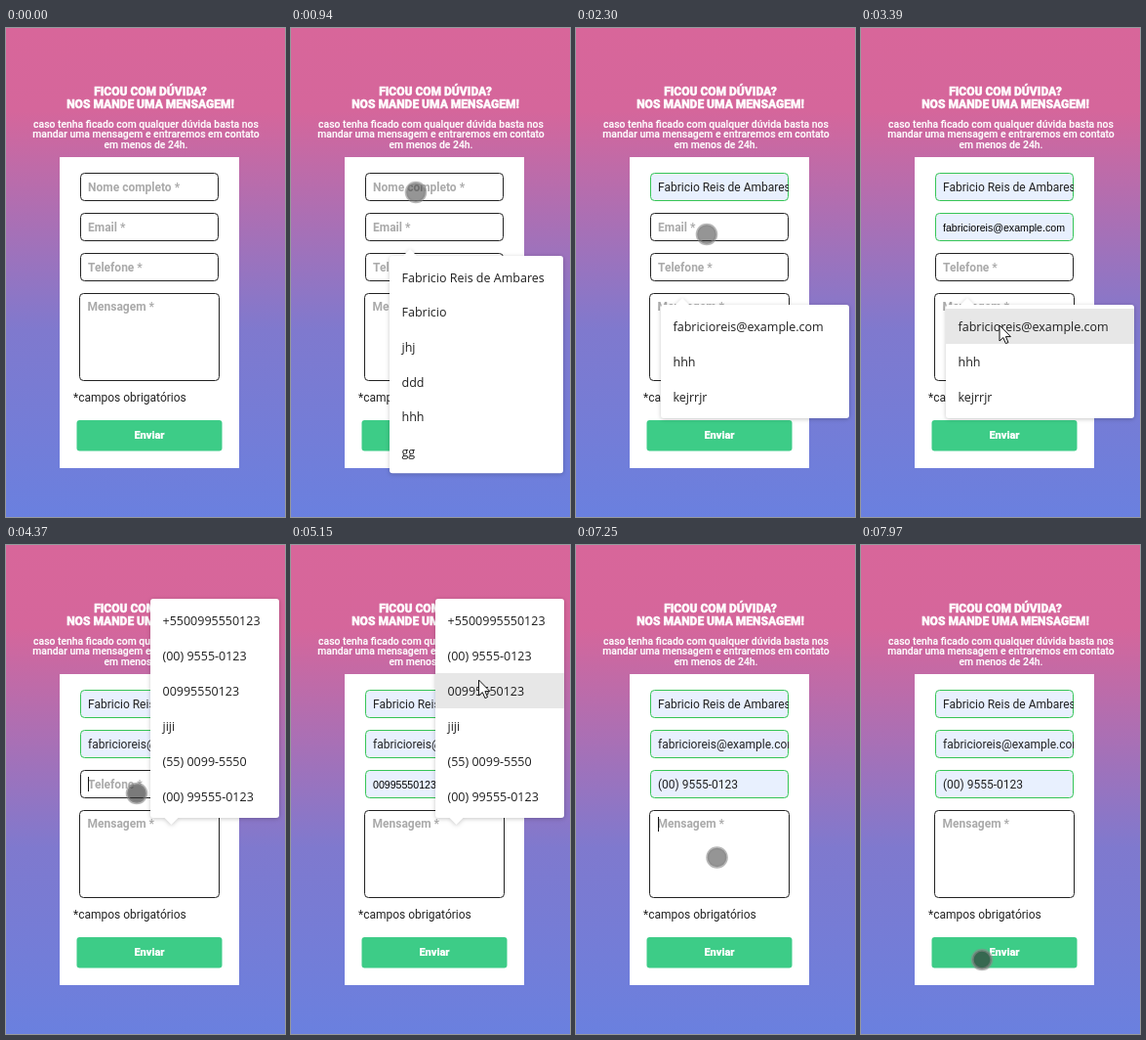
An HTML page that plays this animation: 286x500 px, repeating every 8 s.

```html
<!DOCTYPE html>
<html lang="pt">
<head>
<meta charset="utf-8">
<title>Formulário</title>
<style>
html, body { margin: 0; width: 100%; height: 100%; overflow: hidden; }
svg { display: block; }
#stage { width: 286px; height: 500px; font: 12px Roboto, sans-serif;
  background: linear-gradient(#d8669a, #d5669b 17%, #7f79ce 62%, #6a80df); }
.head, .sub, .send { fill: #fff; stroke: #fff; text-anchor: middle; }
.head { font-weight: 900; stroke-width: .4px; }
.sub { font-weight: 500; font-size: 10.4px; stroke-width: .15px; }
.send { font-weight: 900; font-size: 11px; stroke-width: .2px; }
.box { fill: #fff; stroke: #222; }
.box.filled { fill: #e8f0fe; stroke: #35c556; }
.value { fill: #222; }
.value.empty { font-weight: 700; fill: #aaa; }
.value.preview { font: 10.6px "Liberation Sans", Arial, sans-serif; fill: #000; }
.popup { font: 12.5px "Open Sans", "Noto Sans", sans-serif; fill: #1f1f1f;
  filter: drop-shadow(0 1px 2px rgba(0, 0, 0, .22)); }
.panel { fill: #fff; }
.hover { fill: #e7e7e7; }
</style>
</head>
<body>
<svg id="stage" viewBox="0 0 286 500">
  <text class="head" x="148" y="69">FICOU COM DÚVIDA?</text>
  <text class="head" x="148" y="82">NOS MANDE UMA MENSAGEM!</text>
  <text class="sub" x="143.5" y="102">caso tenha ficado com qualquer dúvida basta nos</text>
  <text class="sub" x="143.5" y="112">mandar uma mensagem e entraremos em contato</text>
  <text class="sub" x="143.5" y="123">em menos de 24h.</text>
  <rect x="55" y="132" width="184" height="318" fill="#fff"/>
  <g id="fields"></g>
  <rect class="box" x="75.5" y="271.5" width="143" height="89" rx="4"/>
  <text class="value empty" x="83.5" y="289">Mensagem *</text>
  <text x="69" y="382" fill="#222">*campos obrigatórios</text>
  <rect x="72.5" y="401" width="149" height="31.5" rx="3" fill="#3dcc87"/>
  <text class="send" x="147" y="420">Enviar</text>
  <rect id="caret" width="1" height="15" fill="#111"/>
  <g id="popups"></g>
  <g id="touch">
    <circle r="9.8" fill="#333" stroke="#888" stroke-opacity=".6" stroke-width="3"/>
  </g>
  <path id="arrow" d="M0 0V16L3.8 12.6 6.4 18.6 9 17.5 6.4 11.6H11.4Z" fill="#fff" stroke="#111"/>
</svg>
<script>
const LOOP = 8000;
const INNER = 134; // visible text width of a field
const $ = id => document.getElementById(id);

function add(parent, tag, attrs, text = '') {
  const el = document.createElementNS('http://www.w3.org/2000/svg', tag);
  for (const key in attrs) el.setAttribute(key, attrs[key]);
  el.textContent = text;
  return parent.appendChild(el);
}

// focus: tap on the field, open: list fades in, pick: row is chosen, blur: focus leaves
const fields = [
  { label: 'Nome completo *', y: 148, focus: 165, open: 260, pick: 1530, blur: 1790, choice: 0,
    x: 101, top: 233, w: 178, pitch: 35.7, tip: 122,
    rows: ['Fabricio Reis de Ambares', 'Fabricio', 'jhj', 'ddd', 'hhh', 'gg'] },
  { label: 'Email *', y: 189, focus: 1790, open: 1900, pick: 3560, blur: 4220, choice: 0,
    x: 87, top: 283, w: 193, pitch: 36, tip: 109,
    rows: ['fabricioreis@example.com', 'hhh', 'kejrrjr'] },
  { label: 'Telefone *', y: 230, focus: 4220, open: 4225, pick: 5730, blur: 6220, choice: 1,
    x: 148, top: 55, w: 132, pitch: 36, tip: 169.5, above: true,
    rows: ['+5500995550123', '(00) 9555-0123', '00995550123', 'jiji', '(55) 0099-5550', '(00) 99555-0123'] }
];

const moves = [
  [160, 126, 168], [300, 128, 168], [940, 128, 168], [1280, 138, 239], [1590, 138, 239],
  [1760, 134, 211], [2590, 134, 211], [3050, 142, 304], [3620, 142, 304], [4160, 134, 254],
  [4580, 134, 254], [4780, 170, 205], [5120, 192.5, 138], [5170, 192.5, 138], [5340, 195, 116],
  [5770, 195, 116], [6180, 160, 288], [6290, 160, 288], [6770, 146, 312], [7130, 146, 312],
  [7900, 124, 424], [LOOP, 124, 424]
];
const presses = [[165, 280], [1790, 1890], [4220, 4380], [6220, 6290], [7960, LOOP]];

for (const f of fields) {
  f.h = f.rows.length * f.pitch + 8;
  f.box = add($('fields'), 'rect', { x: 76.5, y: f.y + .5, width: 141, height: 28, rx: 4 });
  const clip = add($('fields'), 'svg', { x: 84, y: f.y, width: INNER, height: 29 });
  f.value = add(clip, 'text', { x: 0, y: 19 });

  f.popup = add($('popups'), 'g', { class: 'popup' });
  const edge = f.above ? f.top + f.h - 1 : f.top + 1;
  add(f.popup, 'path', { class: 'panel', d: `M${f.tip - 8} ${edge}h16l-8 ${f.above ? 8 : -8}z` });
  add(f.popup, 'rect', { class: 'panel', x: f.x, y: f.top, width: f.w, height: f.h, rx: 3 });
  f.hover = add(f.popup, 'rect', { class: 'hover', x: f.x, width: f.w, height: f.pitch });
  f.rows.forEach((row, i) =>
    add(f.popup, 'text', { x: f.x + 12.5, y: f.top + 26.5 + i * f.pitch }, row));
}

const clamp = v => Math.max(0, Math.min(1, v));
const ease = v => v * v * (3 - 2 * v);
const show = (el, on) => el.setAttribute('visibility', on ? 'visible' : 'hidden');

function pointerAt(t) {
  const i = Math.max(1, moves.findIndex(m => m[0] > t));
  const [t0, x0, y0] = moves[i - 1], [t1, x1, y1] = moves[i];
  const k = ease(clamp((t - t0) / (t1 - t0)));
  return [x0 + (x1 - x0) * k, y0 + (y1 - y0) * k];
}

function drawField(f, t, x, y) {
  const alpha = Math.min(clamp((t - f.open) / 140), clamp((f.pick + 190 - t) / 180));
  const over = alpha > 0 && x >= f.x && x <= f.x + f.w && y >= f.top && y <= f.top + f.h;
  const row = over ? Math.min(f.rows.length - 1, Math.max(0, Math.floor((y - f.top - 4) / f.pitch))) : -1;
  const picked = t >= f.pick;
  const text = f.rows[picked ? f.choice : row];

  f.popup.style.opacity = alpha;
  f.popup.style.display = alpha ? '' : 'none';
  f.hover.style.display = over ? '' : 'none';
  f.hover.setAttribute('y', f.top + 4 + row * f.pitch);
  f.box.setAttribute('class', text ? 'box filled' : 'box');
  f.value.setAttribute('class', 'value ' + (picked ? '' : text ? 'preview' : 'empty'));
  f.value.textContent = text || f.label;
  return over;
}

function drawCaret(t) {
  const f = fields.find(f => t >= f.focus && t < f.blur);
  const picked = f && t >= f.pick;
  const start = picked ? f.pick : f ? f.focus : 6220;
  const end = picked ? f.value.getComputedTextLength() : 0;
  show($('caret'), t >= start && (t - start) % 1000 < 500 && end < INNER);
  $('caret').setAttribute('x', 84 + end);
  $('caret').setAttribute('y', f ? f.y + 7 : 278);
}

function draw(t) {
  const [x, y] = pointerAt(t);
  const over = fields.map(f => drawField(f, t, x, y)).includes(true);
  drawCaret(t);
  show($('arrow'), over);
  show($('touch'), !over && t >= 160);
  for (const id of ['arrow', 'touch']) $(id).setAttribute('transform', `translate(${x} ${y})`);
  const pressed = presses.some(([a, b]) => t >= a && t < b);
  $('touch').firstElementChild.setAttribute('fill-opacity', pressed ? .65 : .52);
}

const begin = performance.now();
function tick() {
  draw((performance.now() - begin) % LOOP);
  requestAnimationFrame(tick);
}
tick();
</script>
</body>
</html>
```
